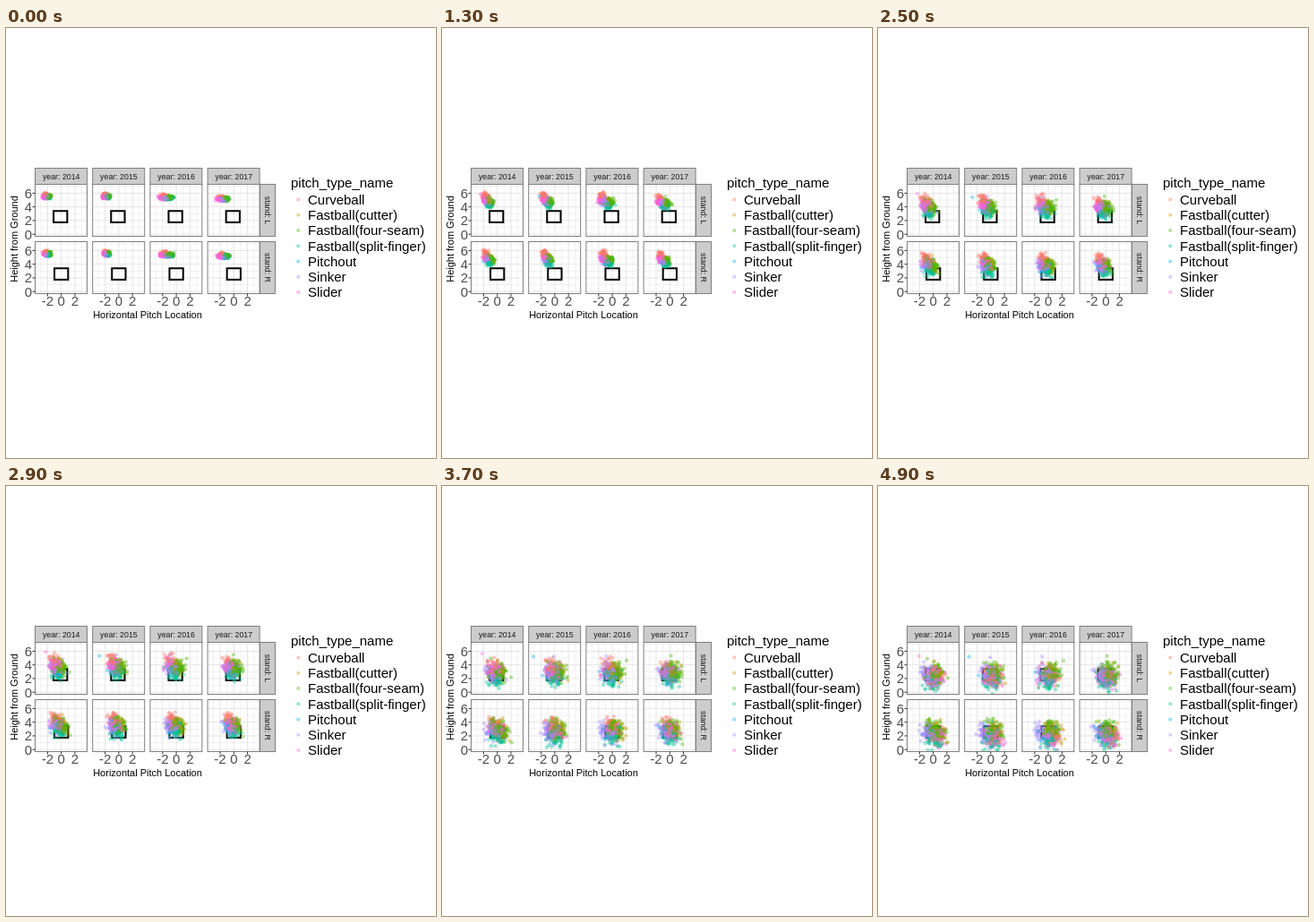
These frames come from a looping animation (480 px wide and 480 px high, 5 s). An HTML page with a canvas:

```html
<!DOCTYPE html>
<html lang="en">
<head>
<meta charset="utf-8">
<title>Pitch locations</title>
<style>
  html, body { margin: 0; width: 100%; height: 100%; overflow: hidden; background: #fff; }
  canvas { display: block; width: 480px; height: 480px; }
</style>
</head>
<body>
<canvas id="stage" width="480" height="480"></canvas>
<script>
const ctx = document.getElementById('stage').getContext('2d');
const LOOP = 5000, STEP = 100;
const UNIT = 7.63, SIZE = 58, PITCH = 64.2, LEFT = 32.5, TOP = 174.5;
const COUNT = 340;

// off: release offset, lift: release height offset, L/R: mean plate location,
// sag: vertical arc, tail: sideways arc, time: flight time in ms
const TYPES = [
  { name: 'Curveball', color: '#F8766D', share: .1, off: -.3, lift: .25, L: [.1, 2.3], R: [.3, 2.2], sag: 4.4, tail: -.9, time: 4800 },
  { name: 'Fastball(cutter)', color: '#C49A00', share: .07, off: .1, lift: .05, L: [.6, 2.8], R: [.8, 2.7], sag: .9, tail: .1, time: 4080 },
  { name: 'Fastball(four-seam)', color: '#53B400', share: .27, off: .5, lift: 0, L: [.5, 2.8], R: [.45, 2.7], sag: .5, tail: .5, time: 3900 },
  { name: 'Fastball(split-finger)', color: '#00C094', share: .15, off: .5, lift: -.1, L: [0, 1.4], R: [.1, 1.2], sag: .5, tail: .6, time: 4150 },
  { name: 'Pitchout', color: '#00B6EB', share: .015, off: 0, lift: 0, L: [-.4, 2.4], R: [-.4, 2.4], sag: .5, tail: .4, time: 3700 },
  { name: 'Sinker', color: '#A58AFF', share: .2, off: 0, lift: -.1, L: [-.35, 2.5], R: [-.75, 2.3], sag: .9, tail: 1.1, time: 3960 },
  { name: 'Slider', color: '#FB61D7', share: .195, off: -.5, lift: -.05, L: [.25, 2.2], R: [.6, 1.9], sag: 2.4, tail: -.5, time: 4380 }
];

const YEARS = [
  { year: 2014, x: -2.15, y: 5.55, width: .55 },
  { year: 2015, x: -1.85, y: 5.55, width: .5 },
  { year: 2016, x: -1.5, y: 5.4, width: .95 },
  { year: 2017, x: -1.6, y: 5.2, width: .8 }
];

// [column, row, type, plate x, plate y]
const STRAYS = [
  [1, 0, 4, -3.2, 5.2], [2, 0, 2, 2.2, 4.6], [0, 0, 6, -2.1, 5.3],
  [0, 0, 2, -.9, 4.9], [3, 0, 2, .2, 5.3], [1, 0, 5, -.1, 5.1], [2, 0, 5, -.9, 5.2]
];

let seed = 2017;
function random() {
  seed = (seed + 0x6D2B79F5) | 0;
  let t = Math.imul(seed ^ (seed >>> 15), 1 | seed);
  t = (t + Math.imul(t ^ (t >>> 7), 61 | t)) ^ t;
  return ((t ^ (t >>> 14)) >>> 0) / 4294967296;
}
const bell = () => (random() + random() + random() - 1.5) * 2;

function pickType() {
  let r = random();
  return TYPES.find(type => (r -= type.share) < 0) || TYPES[6];
}

function makePitch(type, season, row, end) {
  if (!end) {
    const [mx, my] = row ? type.R : type.L;
    const dx = bell() * .66;
    end = [mx + dx, my + bell() * .72 - (row ? .25 : .1) * dx];
  }
  return {
    color: type.color,
    x0: season.x + row * .06 + season.width * (type.off + bell() * .3),
    y0: season.y + type.lift + bell() * .13,
    x1: end[0], y1: end[1],
    sag: type.sag + bell() * .35,
    tail: type.tail + bell() * .2,
    time: type.time + bell() * 90
  };
}

const panels = [];
for (let row = 0; row < 2; row++) {
  YEARS.forEach((season, col) => {
    const pitches = Array.from({ length: COUNT }, () => makePitch(pickType(), season, row));
    for (const [c, r, k, x, y] of STRAYS) {
      if (c === col && r === row) pitches.push(makePitch(TYPES[k], season, row, [x, y]));
    }
    panels.push({ row, left: LEFT + col * PITCH, top: TOP + row * 64, pitches });
  });
}

function line(x1, y1, x2, y2, color, width) {
  ctx.strokeStyle = color;
  ctx.lineWidth = width;
  ctx.beginPath();
  ctx.moveTo(x1, y1);
  ctx.lineTo(x2, y2);
  ctx.stroke();
}

function text(str, x, y, size, color = '#000', align = 'center', angle = 0) {
  ctx.save();
  ctx.translate(x, y);
  ctx.rotate(angle);
  ctx.font = size + 'px "Liberation Sans", Arial, sans-serif';
  ctx.fillStyle = color;
  ctx.textAlign = align;
  ctx.fillText(str, 0, 0);
  ctx.restore();
}

function frameBox(x, y, w, h, fill) {
  if (fill) {
    ctx.fillStyle = fill;
    ctx.fillRect(x, y, w, h);
  }
  ctx.strokeStyle = '#7f7f7f';
  ctx.lineWidth = 1;
  ctx.strokeRect(x, y, w, h);
}

function dot(x, y, color) {
  ctx.globalAlpha = .34;
  ctx.fillStyle = ctx.strokeStyle = color;
  ctx.lineWidth = .8;
  ctx.beginPath();
  ctx.arc(x, y, 1.75, 0, Math.PI * 2);
  ctx.fill();
  ctx.stroke();
  ctx.globalAlpha = 1;
}

function drawPanel({ row, left, top, pitches }, t) {
  const px = x => left + 29.2 + x * UNIT;
  const py = y => top + 55.7 - y * UNIT;
  ctx.save();
  ctx.beginPath();
  ctx.rect(left, top, SIZE, SIZE);
  ctx.clip();
  for (const odd of [1, 0]) {
    for (let v = -3; v <= 7; v++) {
      if (Math.abs(v % 2) !== odd) continue;
      const color = odd ? '#f1f1f1' : '#e5e5e5';
      if (v <= 3) line(px(v), top, px(v), top + SIZE, color, 1);
      if (v >= 0) line(left, py(v), left + SIZE, py(v), color, 1);
    }
  }
  ctx.strokeStyle = '#000';
  ctx.lineWidth = 2;
  ctx.strokeRect(px(row ? -1 : -1.13), py(3.4), 2 * UNIT, 1.66 * UNIT);
  for (const p of pitches) {
    const u = Math.min(1, t / p.time), arc = u * (1 - u);
    dot(px(p.x0 + (p.x1 - p.x0) * u + p.tail * arc),
        py(p.y0 + (p.y1 - p.y0) * u + p.sag * arc), p.color);
  }
  ctx.restore();
  frameBox(left, top, SIZE, SIZE);

  if (row) {
    for (const v of [-2, 0, 2]) {
      line(px(v), top + SIZE, px(v), top + SIZE + 3, '#333', 1);
      text(String(v), px(v), 310, 15, '#4d4d4d');
    }
  }
  if (left === LEFT) {
    for (const v of [0, 2, 4, 6]) {
      line(left - 3, py(v), left, py(v), '#333', 1);
      text(String(v), left - 3.3, py(v) + 5.4, 15, '#4d4d4d', 'right');
    }
  }
}

function draw(t) {
  ctx.fillStyle = '#fff';
  ctx.fillRect(0, 0, 480, 480);
  for (const panel of panels) drawPanel(panel, t);

  YEARS.forEach(({ year }, col) => {
    const x = LEFT + col * PITCH;
    frameBox(x, 156.5, SIZE, 18, '#ccc');
    text('year: ' + year, x + 29.2, 169, 8.8, '#1a1a1a');
  });
  ['L', 'R'].forEach((side, row) => {
    const y = TOP + row * 64;
    frameBox(283.5, y, 17, SIZE, '#ccc');
    text('stand: ' + side, 289, y + 29, 8.8, '#1a1a1a', 'center', Math.PI / 2);
  });

  text('Horizontal Pitch Location', 158, 324, 11);
  text('Height from Ground', 13, 235.5, 11, '#000', 'center', -Math.PI / 2);

  text('pitch_type_name', 318, 178, 15, '#000', 'left');
  TYPES.forEach(({ name, color }, i) => {
    const y = 191.4 + i * 17.28;
    dot(326.3, y, color);
    text(name, 337, y + 5.4, 15, '#000', 'left');
  });
}

const start = performance.now();
let shown = -1;
function tick() {
  const t = Math.floor(((performance.now() - start) % LOOP) / STEP) * STEP;
  if (t !== shown) draw(shown = t);
  requestAnimationFrame(tick);
}
tick();
</script>
</body>
</html>
```
